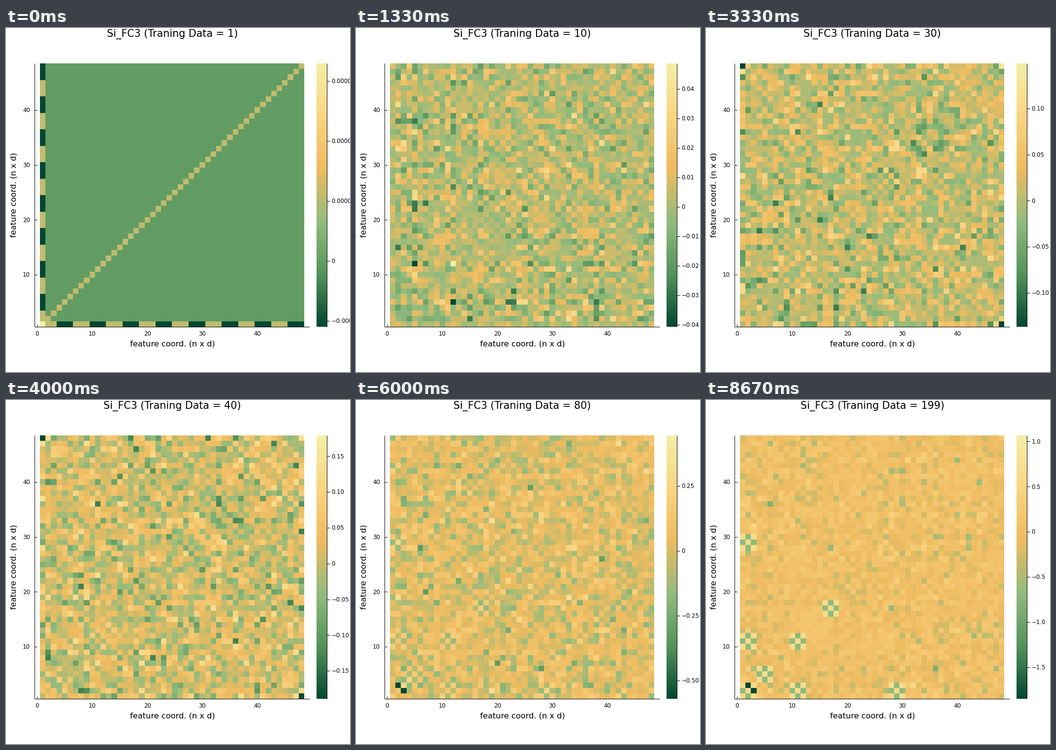
These frames come from a looping animation (699 by 700 pixels, 9340 ms). A matplotlib script:

```python
import numpy as np
import matplotlib.pyplot as plt
from matplotlib.animation import FuncAnimation
from matplotlib.colors import LinearSegmentedColormap

W, H, DPI = 699, 700, 100
LOOP, HOLD, FRAMES = 9340, 667, 203
N = 48
LEFT, RIGHT, TOP, BOTTOM = 69, 606, 72, 608
COUNTS = [1, 5, 10, 15, 20, 30, 40, 50, 60, 80, 100, 130, 160, 199]

# Value range and noise level at a few training sizes
KNOWN = [1, 10, 20, 40, 60, 130, 199]
VMAX = [8.238e-5, 0.0487, 0.1153, 0.179, 0.3815, 0.5755, 1.068]
VMIN = [2.746e-5, 0.0407, 0.0869, 0.189, 0.384, 1.11, 1.85]
NOISE = [0.2, 0.2, 0.18, 0.25, 0.21, 0.12, 0.115]

HUBS = [(12, 5), (33, 28), (48, 1), (3, 2)]              # strongest pair
BLOCKS = [(1, 1), (4, 4), (10, 10), (16, 16), (10, 1), (28, 1)]


def at_count(n, values):
    return np.interp(np.log(n), np.log(KNOWN), values)


def value_range(n):
    return tuple(np.exp(at_count(n, np.log(v))) for v in (VMIN, VMAX))


def first_matrix():
    m = np.eye(N) / 3
    m[0] = m[:, 0] = np.where(np.arange(N) // 3 % 2, -1, 1 / 3)
    m[0, 0] = 1
    return m


def build_matrices():
    """Matrices as shares of the value range, from slowly settling noise."""
    rng = np.random.default_rng(48)

    def symmetric():
        a = np.triu(rng.normal(size=(N, N)))
        return a + np.triu(a, 1).T

    a, b = np.indices((3, 3))
    checker = np.where((a + b) % 2, -0.38, 0.6)

    out = [first_matrix()]
    field, gain = symmetric(), rng.normal(size=N)
    for i, n in enumerate(COUNTS[1:], 1):
        keep = np.interp(i, [1, 6, 13], [0.4, 0.65, 0.88])
        fresh = np.sqrt(1 - keep ** 2)
        field = keep * field + fresh * symmetric()
        gain = keep * gain + fresh * rng.normal(size=N)

        row, col = np.array(HUBS[min((i - 1) // 2, 3)]) - 1
        amp = np.exp(np.interp(i, [1, 6], [0.4, 0.2]) * gain)
        amp[[row, col]] *= 2
        m = (field * np.sqrt(np.outer(amp, amp)) + 0.25) * at_count(n, NOISE)
        m = np.clip(m, -0.7, 0.7)

        grow = np.interp(i, [5, 12], [0, 1])
        for r, c in BLOCKS:
            part = m[r - 1:r + 2, c - 1:c + 2]
            part += grow * (checker - part)
            m[c - 1:c + 2, r - 1:r + 2] = part.T
        m[row, col] = m[col, row] = -1
        m[row, row] = np.interp(i, [4, 8], [1, 0.6])
        out.append(m)
    return out


def nice_step(span):
    for e in range(-6, 2):
        for base in (1, 2.5, 5):
            step = base * 10.0 ** e
            if span / step < 9:
                return step


def label(v, step):
    if abs(v) < step / 2:
        return "0"
    digits = len(f"{step:.7f}".rstrip("0").split(".")[1])
    return f"{v:.{digits}f}".replace("-", "\u2212")


plt.rcParams["font.family"] = "DejaVu Sans"
SMALL, MEDIUM, LARGE = 8.5, 11.7, 14.85
cmap = LinearSegmentedColormap.from_list(
    "field", ["#034732", "#53935a", "#92bc7e", "#eebb60", "#fad582", "#f3efa8"], 512)
matrices = build_matrices()

fig = plt.figure(figsize=(W / DPI, H / DPI), dpi=DPI, facecolor="white")
ax = fig.add_axes([0, 0, 1, 1])
ax.axis("off")


def line(xs, ys, z=1, **kw):
    return ax.plot(xs, ys, zorder=z, color="black", lw=72 / DPI,
                   solid_capstyle="butt", **kw)[0]


def image(data, x0, x1):
    return ax.imshow(data, cmap=cmap, origin="lower", aspect="auto",
                     interpolation="nearest", zorder=3,
                     extent=(x0, x1, BOTTOM, TOP))


# Axes, ticks and faint grid
for k in range(0, 50, 10):
    x = LEFT + (k - 0.5) * (RIGHT - LEFT) / N
    y = BOTTOM - (k - 0.5) * (BOTTOM - TOP) / N
    line([x, x], [TOP, BOTTOM], 0, alpha=0.08)
    line([x, x], [603, 608])
    ax.text(x, 625.8, str(k), size=SMALL, ha="center")
    if k:
        line([58, 617], [y, y], 0, alpha=0.08)
        line([58, 63], [y, y])
        ax.text(49, y + 4.3, str(k), size=SMALL, ha="right")
line([58, 58], [TOP, 608], 4)
line([58, 617], [608, 608], 4)
line([652, 652], [TOP, 608], 4)

ax.text(338, 647, "feature coord. (n x d)", size=MEDIUM, ha="center")
ax.text(20.3, 340, "feature coord. (n x d)", size=MEDIUM, ha="center",
        va="baseline", rotation=90, rotation_mode="anchor")
title = ax.text(338, 18.4, "", size=LARGE, ha="center")

heat = image(matrices[0], LEFT, RIGHT)
image(np.linspace(0, 1, 512)[:, None], 631, 652)
bar_ticks = line([], [], 4)
bar_labels = [ax.text(661.5, 0, "", size=SMALL) for _ in range(10)]
ax.set_xlim(0, W)
ax.set_ylim(H, 0)


def draw(frame):
    # The picture jumps within the short frame that holds each change
    i = min(int((frame + 1) * LOOP / FRAMES / HOLD), len(COUNTS) - 1)
    n = COUNTS[i]
    low, high = value_range(n)
    m = matrices[i]
    heat.set_data(np.where(m > 0, m * high, m * low))
    heat.set_clim(-low, high)
    title.set_text(f"Si_FC3 (Traning Data = {n})")

    step = nice_step(low + high)
    values = np.arange(np.ceil(-low / step), np.floor(high / step) + 1) * step
    ys = BOTTOM - (values + low) / (low + high) * (BOTTOM - TOP)
    bar_ticks.set_data(np.tile([652, 658, np.nan], len(ys)), np.repeat(ys, 3))
    for t in bar_labels:
        t.set_text("")
    for t, v, y in zip(bar_labels, values, ys):
        t.set_text(label(v, step))
        t.set_y(y + 4.3)
    return [heat, title, bar_ticks, *bar_labels]


anim = FuncAnimation(fig, draw, frames=FRAMES, interval=LOOP / FRAMES,
                     repeat=True, repeat_delay=0, blit=False)
plt.show()
```
